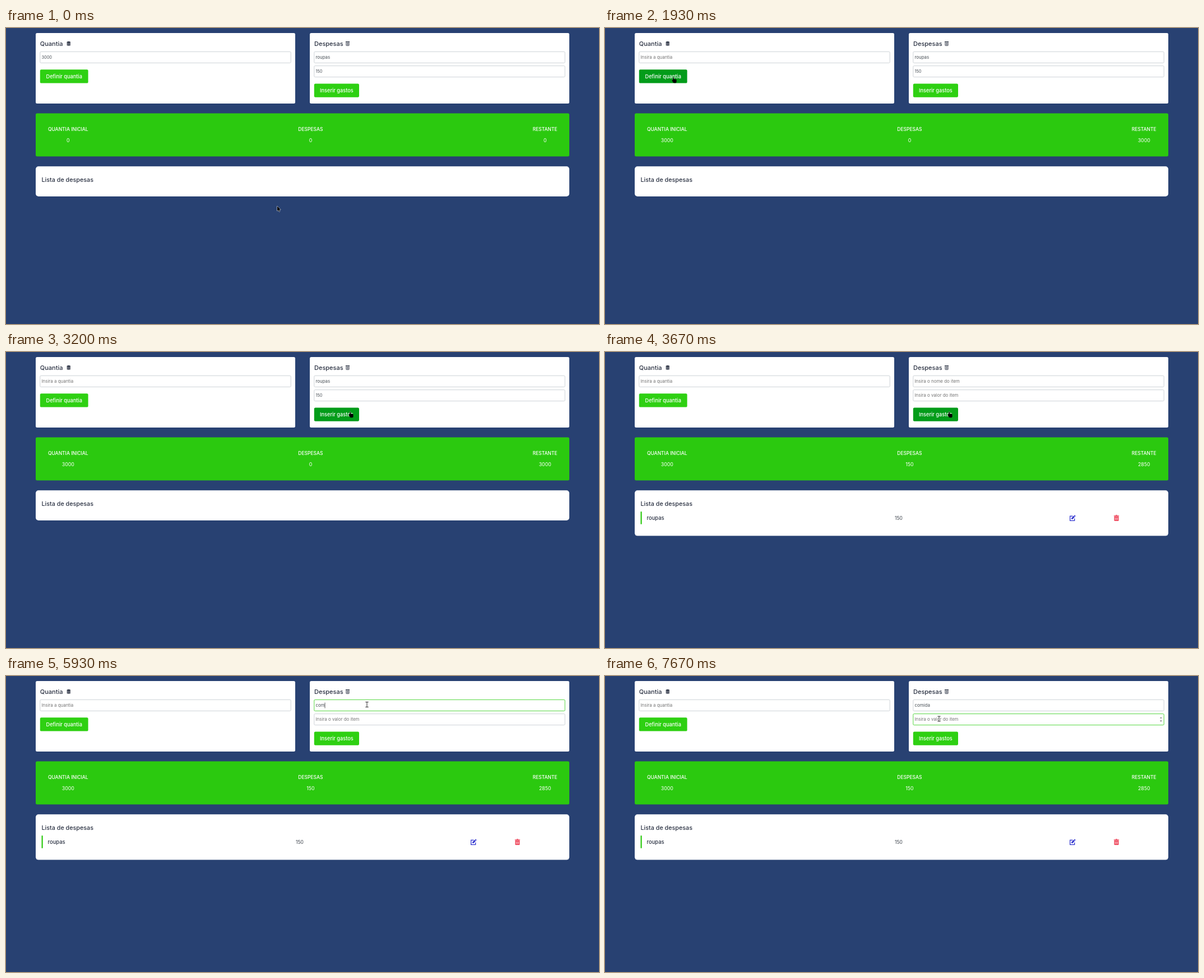
An HTML page with a canvas that plays this animation: 1058x529 px, repeating every 8 s.

```html
<!DOCTYPE html>
<html lang="pt">
<head>
<meta charset="utf-8">
<title>Despesas</title>
<style>
html, body { margin: 0; width: 100%; height: 100%; overflow: hidden; background: #284172; }
canvas { display: block; width: 1058px; height: 529px; }
</style>
</head>
<body>
<canvas id="stage" width="1058" height="529"></canvas>
<script>
const ctx = document.getElementById('stage').getContext('2d');
const TICK = 1000 / 15, TICKS = 120;
const NAVY = '#284172', INK = '#2a3142', GREEN = '#2bc90f', FIELD = '#495057', HINT = '#757575';

// Layout: a 90% wide column, two equal cards on top
const LEFT = 53, WIDTH = 952, CARD = 463, PAD = 7.8, ROW = 25.2;
const cards = [LEFT, LEFT + WIDTH - CARD];

const field = (card, row, hint, number) =>
  ({ x: cards[card] + PAD, y: 42.4 + row * ROW, w: CARD - 2 * PAD, h: 20, hint, number });
const button = (card, row, w, label) =>
  ({ x: cards[card] + PAD, y: 74.3 + row * ROW, w, h: 24.3, label });

const fields = [
  field(0, 0, 'Insira a quantia', true),
  field(1, 0, 'Insira o nome do item', false),
  field(1, 1, 'Insira o valor do item', true)
];
const buttons = [
  button(0, 0, 85.8, 'Definir quantia'),
  button(1, 0 + 1, 80.2, 'Inserir gastos')
];

// When things happen, in ticks
const SET = 29, SPEND = 55, NAME = 66, TYPE = 85, VALUE = 107;

// Pointer moves: eased curves between resting points
const home = [484, 318.5];
const moves = [
  { from: 0, to: 8, end: [64, 53], bend: [290, 130] },
  { from: 8, to: 13, end: [177, 120], bend: [60, 190] },
  { from: 13, to: 24, end: [122, 88], bend: [133, 48] },
  { from: 32, to: 44, end: [623, 117.5], bend: [780, 505] },
  { from: 44, to: 48, end: [614, 107] },
  { from: 58, to: 66, end: [619, 51], bend: [640, 200] },
  { from: 69, to: 71, end: [644, 51] },
  { from: 98, to: 99, end: [637, 56] },
  { from: 103, to: 107, end: [594, 76] },
  { from: 109, to: 111, end: [596, 76.5] }
];

const clamp = v => Math.min(1, Math.max(0, v));
const smooth = f => f * f * (3 - 2 * f);

function pointerAt(n) {
  let start = home;
  for (const { from, to, end, bend = start } of moves) {
    if (n < from) break;
    const u = smooth(clamp((n - from) / (to - from))), v = 1 - u;
    const begin = start;
    start = end.map((e, i) => v * v * begin[i] + 2 * u * v * bend[i] + u * u * e);
  }
  return { x: start[0], y: start[1] };
}

const inside = (p, r) => p.x >= r.x && p.x <= r.x + r.w && p.y >= r.y && p.y <= r.y + r.h;

// Hover colour fades in and out over four ticks
function hoverLevel(b, n) {
  let level = 0;
  for (let i = 0; i < n; i++) level = clamp(level + (inside(pointerAt(i), b) ? 0.25 : -0.25));
  return level;
}

function box(x, y, w, h, r, fill, stroke) {
  ctx.beginPath();
  ctx.roundRect(x, y, w, h, r);
  if (fill) { ctx.fillStyle = fill; ctx.fill(); }
  if (stroke) { ctx.strokeStyle = stroke; ctx.lineWidth = 0.9; ctx.stroke(); }
}

function text(str, x, y, size, color, weight = 400, align = 'left') {
  ctx.font = `${weight} ${size}px Inter, "Open Sans", sans-serif`;
  ctx.textAlign = align;
  ctx.fillStyle = color;
  ctx.fillText(str, x, y);
}

function at(x, y, draw) {
  ctx.save();
  ctx.translate(x, y);
  draw();
  ctx.restore();
}

function coins() {
  for (let i = 0; i < 4; i++) {
    ctx.beginPath();
    ctx.ellipse(3.4, 6.4 - i * 1.6, 3.4, 1.7, 0, 0, Math.PI * 2);
    ctx.fillStyle = INK;
    ctx.fill();
    ctx.strokeStyle = '#fff';
    ctx.lineWidth = 0.4;
    ctx.stroke();
  }
}

function receipt() {
  box(0, 0, 7.2, 1.1, 0.3, INK);
  box(1, 1, 5.2, 6.5, 0.4, null, INK);
  box(2.4, 2.5, 2.6, 0.8, 0, INK);
  box(2.4, 4, 2.6, 1.8, 0.8, null, INK);
}

function pencil() {
  const blue = '#3438d0';
  ctx.lineWidth = 1.3;
  ctx.strokeStyle = blue;
  ctx.strokeRect(0.9, 2.1, 8, 8.1);
  box(5.6, 1, 5, 5.4, 0, '#fff');
  at(6.6, 4.4, () => {
    ctx.rotate(-Math.PI / 4);
    box(-4, -1.4, 6.6, 2.8, [0.2, 0, 0, 1.4], blue);
    box(3.2, -1.4, 1.6, 2.8, 0.6, blue);
  });
}

function trash() {
  const red = '#ee3f55';
  box(0, 1, 9.4, 1.3, 0.4, red);
  box(2.9, 0, 3.6, 1.5, 0.6, red);
  box(0.7, 2.9, 8, 8, [0, 0, 1, 1], red);
  for (let i = -1; i < 2; i++) box(4.35 + i * 1.95, 4.3, 0.75, 5, 0.3, '#fff');
}

function spinner(f) {
  const x = f.x + f.w - 5.3, mid = f.y + f.h / 2;
  ctx.fillStyle = '#666';
  for (const side of [-1, 1]) {
    ctx.beginPath();
    ctx.moveTo(x - 1.8, mid + side * 2);
    ctx.lineTo(x, mid + side * 4.1);
    ctx.lineTo(x + 1.8, mid + side * 2);
    ctx.fill();
  }
}

function arrow() {
  const shape = new Path2D('M0 0V8.6L2 6.8 3.3 9.8 4.7 9.2 3.4 6.3 6 6.1Z');
  ctx.strokeStyle = '#fff';
  ctx.lineWidth = 1;
  ctx.stroke(shape);
  ctx.fillStyle = '#000';
  ctx.fill(shape);
}

function hand() {
  box(-1, -0.2, 2.1, 8, 1, '#000', '#ffffff66');
  box(-1.2, 3.6, 6.8, 6.6, [0.5, 1.6, 2, 3], '#000');
  at(-2.2, 5, () => {
    ctx.rotate(-Math.PI / 5);
    box(-0.8, 0, 2, 5, 1, '#000');
  });
}

function beam() {
  for (const [color, width] of [['#fff', 2], ['#333', 1]]) {
    ctx.strokeStyle = color;
    ctx.lineWidth = width;
    ctx.beginPath();
    for (const y of [-4.5, 4.5]) {
      ctx.moveTo(-2.7, y);
      ctx.lineTo(2.7, y);
    }
    ctx.moveTo(0, -4.5);
    ctx.lineTo(0, 4.5);
    ctx.stroke();
  }
}

function drawField(f, value, focused, caret, hovered) {
  box(f.x, f.y, f.w, f.h, 1.6, '#fff', focused ? '#45d32d' : '#c9ced3');
  const x = f.x + 2.6, mid = f.y + f.h / 2;
  const size = value && f.number ? 7.4 : 7.93;
  text(value || f.hint, x, mid + 2.4, size, value ? FIELD : HINT);
  if (caret) {
    const end = value ? x + ctx.measureText(value).width : x - 1;
    box(end, mid - 5, 0.8, 10.2, 0, '#333');
  }
  if (f.number && (focused || hovered)) spinner(f);
}

function drawButton(b, n) {
  const k = hoverLevel(b, n);
  const mix = (from, to) => Math.round(from + (to - from) * k);
  box(b.x, b.y, b.w, b.h, 2.2, `rgb(${mix(46, 3)},${mix(208, 156)},${mix(18, 26)})`);
  text(b.label, b.x + b.w / 2, b.y + b.h / 2 + 3.3, 9.2, '#fff', 500, 'center');
}

function total(label, value, x) {
  text(label, x, 184.4, 8.5, '#fff', 500, 'center');
  text(value, x, 203.7, 8.8, '#fff', 400, 'center');
}

function drawList(spent) {
  box(LEFT, 247.3, WIDTH, spent ? 81.3 : 53.7, 5, '#fff');
  text('Lista de despesas', 63.5, 274.8, 10.75, INK, 500);
  if (!spent) return;
  box(63.5, 285.2, 2.2, 22.5, 0, GREEN);
  text('roupas', 74.6, 299.6, 9.4, INK, 500);
  text('150', 523.9, 299.6, 8.4, '#3c424b', 400, 'center');
  at(828.8, 291.2, pencil);
  at(907.8, 291.2, trash);
}

function render(n) {
  const p = pointerAt(n);
  const set = n >= SET, spent = n >= SPEND;
  const over = fields.map(f => inside(p, f));

  ctx.fillStyle = NAVY;
  ctx.fillRect(0, 0, 1058, 529);
  for (const x of cards) box(x, 9, CARD, 126, 2.5, '#fff');
  text('Quantia', 60.7, 31.6, 11, INK, 500);
  text('Despesas', 550, 31.6, 11, INK, 500);
  at(108.4, 23.8, coins);
  at(605.9, 24, receipt);

  // One letter every two ticks; the caret blinks until typing starts
  const letters = Math.max(0, Math.floor((n - TYPE) / 2) + 1);
  const name = spent ? 'comida'.slice(0, letters) : 'roupas';
  const onName = n >= NAME && n < VALUE, onValue = n >= VALUE;
  const blink = since => Math.floor((n - since) / 8) % 2 === 0;
  drawField(fields[0], set ? '' : '3000', false, false, over[0]);
  drawField(fields[1], name, onName, onName && (letters > 0 || blink(NAME)), over[1]);
  drawField(fields[2], spent ? '' : '150', onValue, onValue && blink(VALUE), over[2]);
  buttons.forEach(b => drawButton(b, n));

  box(LEFT, 152.5, WIDTH, 77, 2.5, GREEN);
  total('QUANTIA INICIAL', set ? '3000' : '0', 110.8);
  total('DESPESAS', spent ? '150' : '0', 543.4);
  total('RESTANTE', spent ? '2850' : set ? '3000' : '0', 961.7);
  drawList(spent);

  const onButton = buttons.some(b => inside(p, b));
  at(p.x, p.y, onButton ? hand : over.includes(true) ? beam : arrow);
}

function loop() {
  render(Math.floor((performance.now() + 5) / TICK) % TICKS);
  requestAnimationFrame(loop);
}
loop();
</script>
</body>
</html>
```
